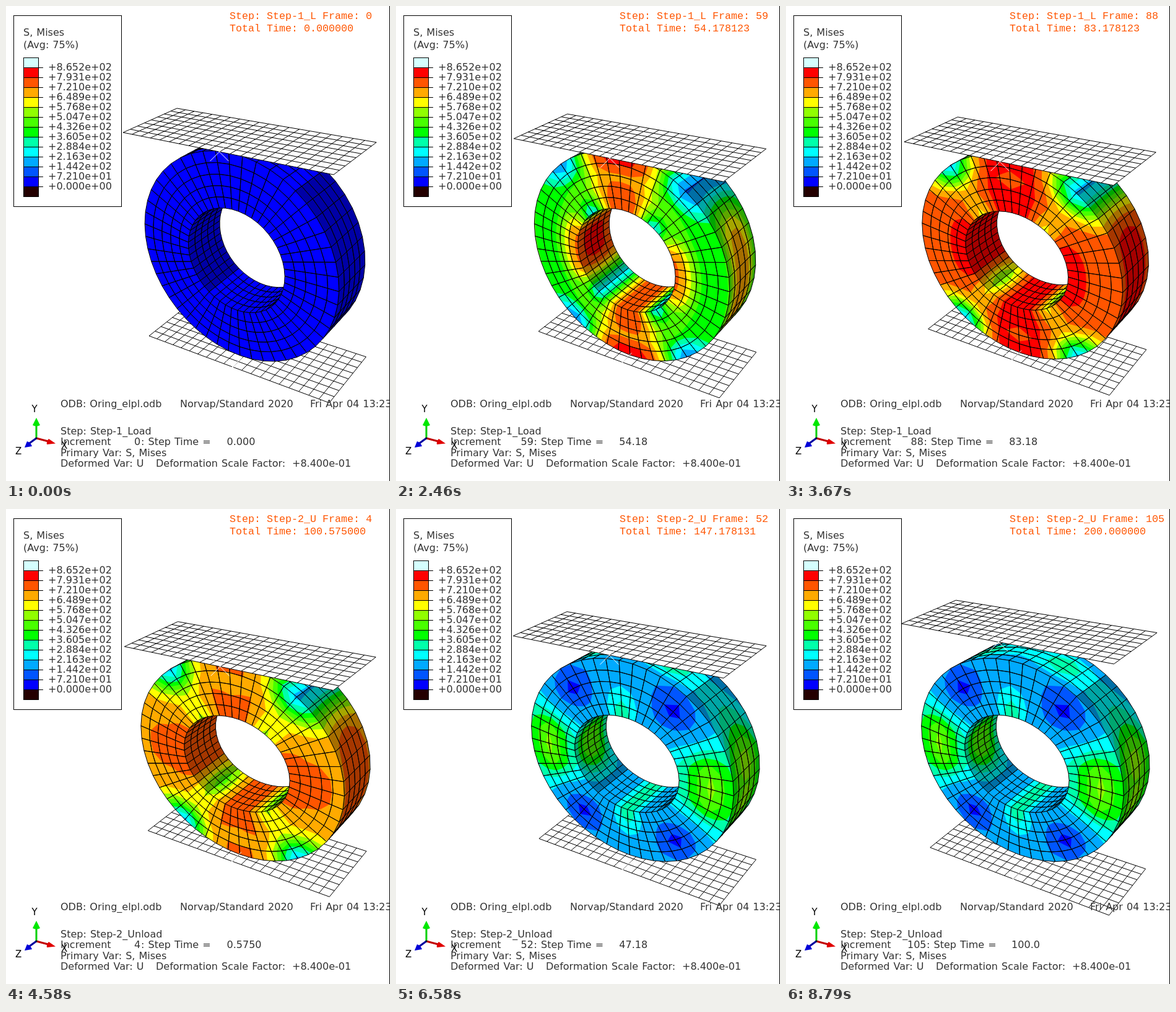
Animation of 620 by 766 pixels, one loop 8830 ms. Source, as an HTML page with a canvas:

```html
<!DOCTYPE html>
<html lang="en">
<head>
<meta charset="utf-8">
<title>Ring compression, Mises stress</title>
<style>
  html, body { margin: 0; width: 100%; height: 100%; overflow: hidden; background: #fff; }
  canvas, svg { position: absolute; left: 0; top: 0; width: 620px; height: 766px; }
  text { font: 16px "DejaVu Sans", sans-serif; word-spacing: 1px; fill: #333; white-space: pre; }
  .clock { font: 16.67px "Liberation Mono", monospace; word-spacing: 0; fill: #ff5500; }
  .axis { font-size: 15px; fill: #000; }
</style>
</head>
<body>
<canvas id="scene" width="620" height="766"></canvas>
<svg id="notes" viewBox="0 0 620 766">
  <rect x="12.5" y="15.5" width="174" height="308" fill="#fff" stroke="#000"/>
  <g id="legend"></g>
  <path d="M619.5 0V766" stroke="#000"/>
  <g id="triad">
    <path d="M49 697V675" stroke="#00d000" stroke-width="3"/>
    <path d="M49 664l6 12q-6 3-12 0z" fill="#00e800"/>
    <path d="M49 697L68 702" stroke="#c00000" stroke-width="3"/>
    <path d="M80 705.500l-14 1.500q-1-5 3-9z" fill="#e00000"/>
    <path d="M49 697L38 705" stroke="#0000a0" stroke-width="3"/>
    <path d="M30 712l4-10q6 2 8 8z" fill="#0000d8"/>
    <circle cx="49" cy="697" r="1.500" fill="#004"/>
  </g>
</svg>
<script>
const LOOP = 8830, STEP = 125 / 3, LAST = 105;
const BANDS = 12, AROUND = 48, ACROSS = 5, DEEP = 5;
const ctx = document.getElementById("scene").getContext("2d");
const svg = document.getElementById("notes");
const clamp = x => Math.max(0, Math.min(1, x));

// blue to red in steps of 20 degrees, with closer greens in the middle
function bandColor(i, light = 1) {
  const hue = i < 5 ? 240 - 20 * i : i > 7 ? 220 - 20 * i : 120 - 17 * (i - 5);
  return `hsl(${hue} 100% ${50 * light}%)`;
}

// ---- labels ----
function make(name, attrs, parent = svg) {
  const el = document.createElementNS("http://www.w3.org/2000/svg", name);
  for (const key in attrs) el.setAttribute(key, attrs[key]);
  return parent.appendChild(el);
}
function label(x, y, str, cls = "") {
  const el = make("text", { x, y, class: cls });
  el.textContent = str;
  return el;
}

function buildLegend() {
  const box = document.getElementById("legend");
  for (let i = 0; i <= BANDS + 1; i++) {
    const y = 83.5 + i * 16, level = BANDS + 1 - i;
    const fill = i === 0 ? "#d5ffff" : level === 0 ? "#240000" : bandColor(level - 1);
    make("rect", { x: 28.5, y, width: 24, height: 16, fill, stroke: "#000" }, box);
    if (i === 0) continue;
    make("path", { d: `M53 ${y}h7`, stroke: "#000" }, box);
    const value = (72.1 * level).toExponential(3).replace(/(\d)$/, "0$1");
    label(68, y + 4.5, "+" + value);
  }
}
buildLegend();
label(28, 48, "S, Mises");
label(28, 68, "(Avg: 75%)");
label(41.5, 655, "Y", "axis");
label(89, 714, "X", "axis");
label(15, 723, "Z", "axis");
label(88, 647, "ODB: Oring_elpl.odb");
label(281, 647, "Norvap/Standard 2020");
label(491, 647, "Fri Apr 04 13:23");
label(88, 726, "Primary Var: S, Mises");
label(88, 743, "Deformed Var: U");
label(242, 743, "Deformation Scale Factor:");
label(462, 743, "+8.400e-01");
label(88, 708, "Increment");
const stepName = label(88, 691, "");
const count = label(207, 708, "");
const stepWord = label(218, 708, ": Step Time =");
const stepTime = label(357, 708, "");
const clockA = label(361, 21, "", "clock");
const clockB = label(361, 41, "", "clock");

// ---- perspective: u along the plate, v up, w into depth ----
function project(u, v, w) {
  const d = 1 - 0.1348 * u - 0.1413 * v + 0.0765 * w;
  return [(231 + 220.6 * u - 68.7 * v + 95.8 * w) / d,
          (532 + 21.7 * u - 356.8 * v - 20.9 * w) / d];
}

// ---- stress in legend bands, at loading, full yield and after unloading ----
const bump = (x, width) => Math.exp(-((x / width) ** 2));
const plateau = (x, width) => Math.exp(-((x / width) ** 4));

function stress(phi, rho, z) {
  const deg = phi * 180 / Math.PI % 180, a = Math.min(deg, 180 - deg);
  const top = plateau(90 - a, 25), side = plateau(a, 38), hinge = bump(a - 52, 14);
  const inner = bump(rho, 0.35), outer = bump(1 - rho, 0.35), core = bump(rho - 0.58, 0.17);
  const mid = 4 * z * (1 - z);
  const elastic = 6 + top * (4.5 + outer - core)
    + side * (4.4 * inner - 1.2 * core + mid * (4 * outer + inner))
    - hinge * (4.3 * outer + 3.5 * inner - 2 * bump(rho - 0.35, 0.35));
  const plastic = 10.6 + top * (0.9 - 1.2 * core * bump(90 - a, 9)) + side * inner
    + mid * side * outer - hinge * (8 * outer + (2 + 1.5 * mid) * inner);
  const residual = 3.2 + 3.3 * plateau(a, 23) * bump(rho - 0.6, 0.55)
    + 0.9 * core * bump(a, 13) + 2 * inner * bump(90 - a, 11)
    - 2 * hinge * bump(rho - 0.62, 0.33) - 0.7 * bump(a - 60, 25)
    - outer * bump(90 - a, 18)
    + mid * (2.5 * inner * side + outer * (1.2 + 1.4 * bump(a - 68, 10) + 1.3 * bump(a - 15, 18)));
  return [elastic, plastic, residual];
}

// ---- ring mesh ----
const nodes = [], walls = [], face = [];
function patch(quads, steps, place, side) {
  const start = nodes.length;
  for (let k = 0; k <= steps; k++) for (let i = 0; i < AROUND; i++) {
    const phi = i / AROUND * 2 * Math.PI, [rho, z] = place(k / steps);
    nodes.push({ phi, r: 0.5 + rho / 2, w: 0.17 + 0.66 * z, s: stress(phi, rho, z) });
  }
  for (let k = 0; k < steps; k++) for (let i = 0; i < AROUND; i++) {
    const a = start + k * AROUND, j = (i + 1) % AROUND;
    const up = side * Math.sin((i + 0.5) / AROUND * 2 * Math.PI);
    quads.push({ ids: [a + i, a + j, a + AROUND + j, a + AROUND + i], side,
      light: side === 0 || up > 0.78 ? 1 : 0.65 });
  }
}
patch(walls, DEEP, z => [1, z], 1);
patch(walls, DEEP, z => [0, z], -1);
patch(face, ACROSS, rho => [rho, 0], 0);

function locate(n, d) {
  const r = n.r + d * Math.cos(2 * n.phi), t = -d / 2 * Math.sin(2 * n.phi);
  const c = Math.cos(n.phi), s = Math.sin(n.phi);
  return project(0.5 + 0.502 * (r * c - t * s), 0.5 + 0.477 * (r * s + t * c), n.w);
}

function trace(pts) {
  pts.forEach((p, i) => i ? ctx.lineTo(p[0], p[1]) : ctx.moveTo(p[0], p[1]));
  ctx.closePath();
}
function fill(pts, style) {
  ctx.fillStyle = style;
  ctx.beginPath();
  trace(pts);
  ctx.fill();
}
// part of a polygon whose value (third entry) is at least the level
function above(pts, level) {
  const out = [];
  pts.forEach((p, i) => {
    const q = pts[(i + 1) % pts.length];
    if (p[2] >= level) out.push(p);
    if ((p[2] >= level) !== (q[2] >= level)) {
      const k = (level - p[2]) / (q[2] - p[2]);
      out.push(p.map((v, j) => v + (q[j] - v) * k));
    }
  });
  return out;
}
function facesViewer([a, b, c], side) {
  const turn = (b[0] - a[0]) * (c[1] - b[1]) - (b[1] - a[1]) * (c[0] - b[0]);
  return side === 0 || turn * side > 0;
}

function drawQuads(quads, pts) {
  const seen = [];
  for (const { ids, side, light } of quads) {
    const p = ids.map(i => pts[i]);
    if (!facesViewer(p, side)) continue;
    seen.push(p);
    const vals = p.map(x => x[2]);
    const low = Math.floor(Math.min(...vals)), high = Math.floor(Math.max(...vals));
    fill(p, bandColor(low, light));
    for (let b = low + 1; b <= high; b++) fill(above(p, b), bandColor(b, light));
  }
  ctx.beginPath();
  seen.forEach(trace);
  ctx.stroke();
}

function drawRing(d, mix) {
  const pts = nodes.map(n => {
    const v = n.s.reduce((sum, s, i) => sum + s * mix[i], 0);
    return [...locate(n, d), Math.max(0, Math.min(BANDS - 0.05, v))];
  });
  drawQuads(walls, pts);
  drawQuads(face, pts);
}

function drawPlate(v) {
  const at = (u, w) => project(u, v, w);
  fill([at(0, 0), at(1, 0), at(1, 1), at(0, 1)], "#fff");
  ctx.beginPath();
  const line = (a, b) => { ctx.moveTo(...a); ctx.lineTo(...b); };
  for (let i = 0; i <= 20; i++) line(at(i / 20, 0), at(i / 20, 1));
  for (let i = 0; i <= 8; i++) line(at(0, i / 8), at(1, i / 8));
  ctx.stroke();
}

function drawCross(v) {
  const [x, y] = project(0.5, v, 0);
  ctx.beginPath();
  for (const k of [-15, 15]) { ctx.moveTo(x - k, y - 15); ctx.lineTo(x + k, y + 15); }
  ctx.strokeStyle = "#fff";
  ctx.stroke();
  ctx.strokeStyle = "#000";
}

// ---- time ----
// solver increments: two of 0.1, then growing by half up to 1
function solverTime(n) {
  let t = 0, inc = 0.1;
  for (let i = 0; i < n; i++) {
    if (i > 1) inc = Math.min(1, inc * 1.5);
    t += inc;
  }
  return Math.min(100, n > 7 ? t - 2e-6 : t);
}

function state(unload, t) {
  if (unload) {
    const k = clamp(t / 4);
    return { gap: -0.0476 + 0.000973 * t, d: 0.0485 - 0.007 * k, mix: [0, 1 - k, k] };
  }
  const on = clamp((t - 46) / 8), flow = clamp((t - 54) / 29);
  return { gap: -0.000476 * t, d: Math.max(0, t - 48) * 0.00093, mix: [on * (1 - flow), flow, 0] };
}

let shown = -1;
function show(index) {
  if (index === shown) return;
  shown = index;
  const unload = index > LAST, n = unload ? index - LAST - 1 : index;
  const t = solverTime(n), { gap, d, mix } = state(unload, t);
  let total = t + (unload ? 100 : 0);
  if (total > 128 && n < LAST) total += 8e-6;

  ctx.fillStyle = "#fff";
  ctx.fillRect(0, 0, 620, 766);
  ctx.strokeStyle = "#000";
  ctx.lineWidth = 1;
  ctx.lineJoin = "round";
  drawPlate(-gap);
  drawRing(d, mix);
  drawPlate(1 + gap);
  drawCross(1 + gap);
  drawCross(-gap);

  const extra = String(n).length - 1;
  stepName.textContent = unload ? "Step: Step-2_Unload" : "Step: Step-1_Load";
  count.textContent = n;
  count.setAttribute("x", 207 - 5.5 * extra);
  stepWord.setAttribute("x", 218 + 4.5 * extra);
  stepTime.textContent = t.toPrecision(4);
  stepTime.setAttribute("x", 356.5 + 3.8 * extra);
  clockA.textContent = `Step: Step-${unload ? "2_U" : "1_L"} Frame: ${n}`;
  clockB.textContent = "Total Time: " + total.toFixed(6);
}

const begin = performance.now();
function tick() {
  const ms = Math.floor((performance.now() - begin) % LOOP / 10) * 10;
  show(Math.min(2 * LAST + 1, Math.ceil((ms + 5) / STEP - 1e-9) - 1));
  requestAnimationFrame(tick);
}
tick();
</script>
</body>
</html>
```
